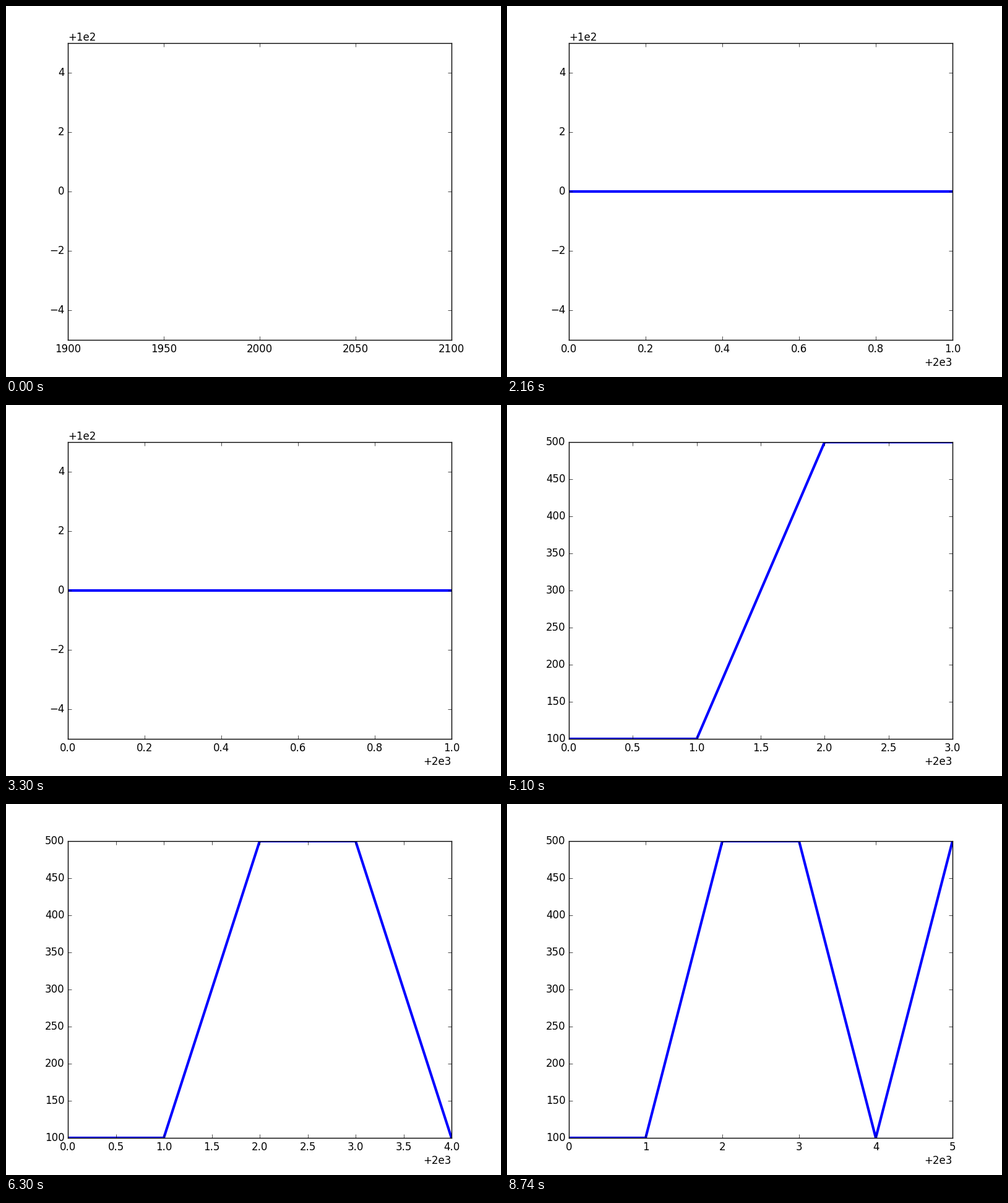
These frames come from a looping animation (800 by 600 pixels, 10000 ms). A matplotlib script:

```python
import matplotlib.pyplot as plt
import numpy as np
from matplotlib.animation import FuncAnimation
from matplotlib.ticker import FixedFormatter, FixedLocator

plt.style.use("classic")
plt.rcParams["font.family"] = "DejaVu Sans"

STEP = 20      # ms per frame
LOOP = 10000   # ms per loop
START = 2000   # first year
VALUES = [100, 100, 500, 500, 100, 500]
ARRIVALS = [0, 2160, 4060, 5100, 6300, 6840]   # ms at which each value appears
X_STEPS = [50, 0.2, 0.5, 0.5, 0.5, 1]

fig = plt.figure(figsize=(8, 6), dpi=100, facecolor="white")


def set_ticks(axis, ticks, base=0, offset="", decimals=0):
    """Label ticks relative to base and show the offset text at the axis end."""
    labels = [f"{t - base:.{decimals}f}".replace("-", "\u2212") for t in ticks]
    formatter = FixedFormatter(labels)
    formatter.set_offset_string(offset)
    axis.set_major_locator(FixedLocator(ticks))
    axis.set_major_formatter(formatter)


def span(lo, hi, step):
    return lo + step * np.arange(round((hi - lo) / step) + 1)


def make_plot(count):
    """Axes showing the first `count` values, scaled tightly to them."""
    ax = fig.add_axes([0.125, 0.1, 0.775, 0.8])
    years = START + np.arange(count)
    ax.plot(years, VALUES[:count], "b", lw=3)

    step = X_STEPS[count - 1]
    if count == 1:
        xlim = START - 100, START + 100
        set_ticks(ax.xaxis, span(*xlim, step))
    else:
        xlim = START, years[-1]
        set_ticks(ax.xaxis, span(*xlim, step), START, "+2e3", int(step < 1))

    if count <= 2:
        ylim = 95, 105
        set_ticks(ax.yaxis, span(96, 104, 2), 100, "+1e2")
    else:
        ylim = 100, 500
        set_ticks(ax.yaxis, span(*ylim, 50))

    ax.set_xlim(xlim)
    ax.set_ylim(ylim)
    ax.set_visible(count == 1)
    return ax


plots = [make_plot(n + 1) for n in range(len(VALUES))]


def update(frame):
    current = np.searchsorted(ARRIVALS, frame * STEP, side="right") - 1
    for n, ax in enumerate(plots):
        ax.set_visible(n == current)
    return plots


anim = FuncAnimation(fig, update, frames=LOOP // STEP, interval=STEP,
                     init_func=lambda: update(0), repeat=True, repeat_delay=0)
plt.show()
```
